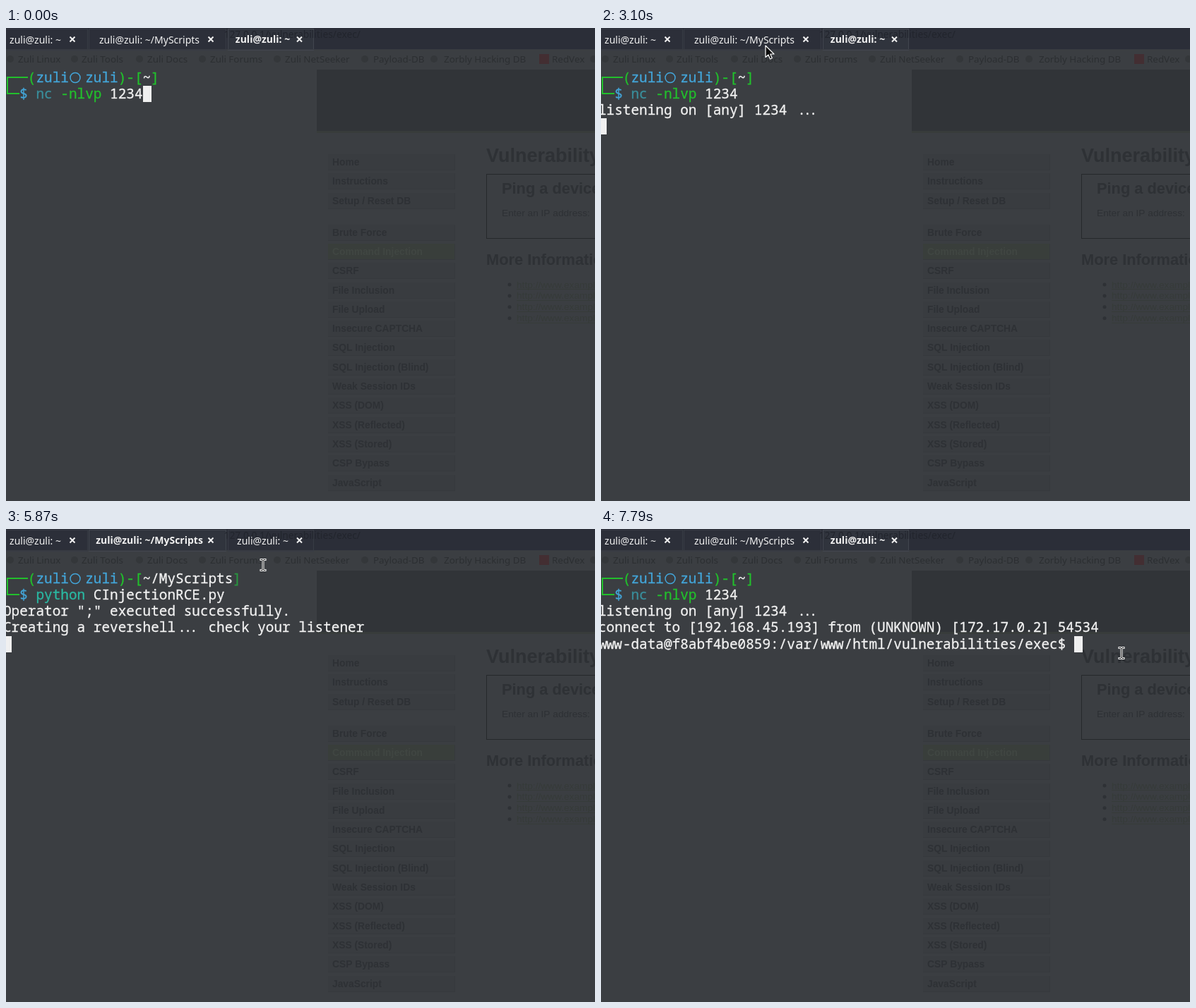
These frames come from a looping animation (834x671 px, 8 s). An HTML page with a canvas:

```html
<!DOCTYPE html>
<html lang="en">
<head>
<meta charset="utf-8">
<title>Terminal session</title>
<style>
html, body { margin: 0; width: 100%; height: 100%; overflow: hidden; background: #3b3e42; }
canvas { display: block; }
</style>
</head>
<body>
<canvas id="stage" width="834" height="671"></canvas>
<script>
const ctx = document.getElementById('stage').getContext('2d');
const LOOP = 8000;
const UI = '"Noto Sans", sans-serif';
const PAGE = '"Liberation Sans", Arial, sans-serif';
const MONO = '500 19.37px "Noto Sans Mono", monospace';
const CELL = 11.62, LINE = 23.3, LEFT = -4, TOP = 58.5;
const GREEN = '#22c02c', BLUE = '#43a6da', WHITE = '#f2f2f2', TEAL = '#3a8e9b', AQUA = '#2ab8a2';
const DIM = '#2e3135';

function rect(x, y, w, h, color) {
  ctx.fillStyle = color;
  ctx.fillRect(x, y, w, h);
}

function label(str, x, y, font, color, align = 'left') {
  ctx.font = font;
  ctx.fillStyle = color;
  ctx.textAlign = align;
  ctx.fillText(str, x, y);
}

function disc(x, y, r, color) {
  ctx.fillStyle = color;
  ctx.beginPath();
  ctx.arc(x, y, r, 0, 7);
  ctx.fill();
}

// ---- Web page showing faintly through the terminal ----
const bookmarks = [
  ['Zuli Linux', 17, 6], ['Zuli Tools', 107, 97], ['Zuli Docs', 200, 189], ['Zuli Forums', 289, 278],
  ['Zuli NetSeeker', 395, 384], ['Payload-DB', 520, 508], ['Zorbly Hacking DB', 620, 606], ['RedVex', 773, 762]
];
const menus = [
  [190, ['Home', 'Instructions', 'Setup / Reset DB']],
  [289.6, ['Brute Force', 'Command Injection', 'CSRF', 'File Inclusion', 'File Upload', 'Insecure CAPTCHA',
    'SQL Injection', 'SQL Injection (Blind)', 'Weak Session IDs', 'XSS (DOM)', 'XSS (Reflected)',
    'XSS (Stored)', 'CSP Bypass', 'JavaScript']]
];

function drawPage() {
  rect(0, 0, 834, 671, '#3b3e42');
  for (const [name, x, iconX] of bookmarks) {
    if (name === 'RedVex') rect(iconX - 7, 37, 14, 14, '#432e32');
    else disc(iconX, 44, 5, '#34373a');
    label(name, x, 48.5, '13.4px ' + UI, '#2c2f32');
  }
  disc(832, 44, 5, '#34373a');
  rect(440, 59, 394, 87, '#313438');
  rect(440, 146, 394, 3, '#383c3b');

  for (const [firstY, items] of menus) {
    items.forEach((item, i) => {
      const y = Math.round(firstY + i * 27.3);
      const chosen = item === 'Command Injection';
      rect(456, y - 11, 180, 23, '#36393d');
      rect(456, y - 11, 179, 22, chosen ? '#393e3b' : '#393c40');
      label(item, 462, y + 5, 'bold 13.8px ' + PAGE, chosen ? '#404642' : DIM);
    });
  }

  label('Vulnerability: Command Injection', 680, 190, 'bold 27px ' + PAGE, DIM);
  ctx.strokeStyle = '#25282b';
  ctx.lineWidth = 1;
  ctx.strokeRect(680.5, 207.5, 200, 91);
  label('Ping a device', 702, 234.5, 'bold 21.8px ' + PAGE, DIM);
  label('Enter an IP address:', 702, 267, '13.7px ' + PAGE, DIM);
  label('More Information', 680, 336, 'bold 21.8px ' + PAGE, DIM);
  for (let i = 0; i < 4; i++) {
    const y = 364 + i * 15.9;
    disc(713, y, 2.5, DIM);
    label('http://www.example.org/', 723, y + 4.5, '13.7px ' + PAGE, '#363b39');
    rect(723, Math.round(y + 6), 111, 1, '#363b39');
  }
}

// ---- Tab bar ----
const tabs = [['zuli@zuli: ~', -6, 115, 41.5, 94], ['zuli@zuli: ~/MyScripts', 117, 311, 203, 290],
  ['zuli@zuli: ~', 314, 435, 363.5, 415.5]];

function drawTabs(active) {
  rect(0, 0, 834, 30, '#2b2e38');
  tabs.forEach(([, x0, x1], i) => {
    rect(x0, 1, x1 - x0, 29, i === active ? '#30343d' : '#2c2f39');
    ctx.strokeStyle = i === active ? '#42464f' : '#383c45';
    ctx.lineWidth = 1;
    ctx.strokeRect(x0 + .5, 1.5, x1 - x0, 30);
  });
  label('127.0.0.1/vulnerabilities/exec/', 502, 14, '13.8px ' + UI, '#22252d', 'right');
  rect(0, 30, 834, 1, '#383b41');
  tabs.forEach(([name, , , center, closeX], i) => {
    const on = i === active;
    label(name, center, on ? 21 : 22, (on ? '600 ' : '') + '14px ' + UI, WHITE, 'center');
    ctx.strokeStyle = WHITE;
    ctx.lineWidth = 2;
    ctx.beginPath();
    for (const s of [-1, 1]) {
      ctx.moveTo(closeX - 3.5, 16 - 3.5 * s);
      ctx.lineTo(closeX + 3.5, 16 + 3.5 * s);
    }
    ctx.stroke();
  });
}

// ---- Terminal ----
// Dots and w's in runs of three sit closer together, as in a ligature font.
function type(str, col, row, color = WHITE) {
  const shift = {};
  for (const m of str.matchAll(/\.\.\.|www/g)) {
    const d = m[0] === 'www' ? 1 : 3.3;
    shift[m.index] = d;
    shift[m.index + 2] = -d;
  }
  const y = Math.round(TOP + 18 + row * LINE);
  ctx.strokeStyle = color;
  ctx.lineWidth = .3;
  [...str].forEach((ch, i) => {
    const x = LEFT + (col + i) * CELL + (shift[i] || 0);
    label(ch, x, y, MONO, color);
    ctx.strokeText(ch, x, y);
  });
}

function block(col, row) {
  rect(Math.round(LEFT + col * CELL), Math.round(TOP + row * LINE), 12, 23, '#f0f0f0');
}

function drawPrompt(dir, bracketColor) {
  ctx.strokeStyle = GREEN;
  ctx.lineWidth = 2;
  ctx.beginPath();
  ctx.moveTo(31, 70);
  ctx.lineTo(2, 70);
  ctx.lineTo(2, 93);
  ctx.lineTo(19, 93);
  ctx.stroke();
  type('(', 3, 0, GREEN);
  type('zuli', 4, 0, BLUE);
  ctx.strokeStyle = BLUE;
  ctx.lineWidth = 1.5;
  ctx.beginPath();
  ctx.arc(98, 70.5, 7, 0, 7);
  ctx.stroke();
  type('zuli', 10, 0, BLUE);
  type(')-[', 14, 0, GREEN);
  type(dir, 17, 0);
  type(']', 17 + dir.length, 0, bracketColor);
  type('$', 2, 1, BLUE);
}

function drawListener(t) {
  drawPrompt('~', GREEN);
  type('nc', 4, 1, TEAL);
  type('-nlvp', 7, 1, GREEN);
  type('1234', 13, 1);
  if (t < 2100) return block(17, 1);
  type('listening on [any] 1234 ...', 0, 2);
  if (t < 6870) return block(0, 3);
  type('connect to [192.168.45.193] from (UNKNOWN) [172.17.0.2] 54534', 0, 3);
  type('www-data@f8abf4be0859:/var/www/html/vulnerabilities/exec$', 0, 4);
  block(58, 4);
}

function drawScript(t) {
  drawPrompt('~/MyScripts', '#2a9440');
  type('python', 4, 1, AQUA);
  type('CInjectionRCE.py', 11, 1);
  if (t < 4680) return block(27, 1);
  if (t < 4880) return block(0, 2);
  type('Operator ";" executed successfully.', 0, 2);
  type('Creating a revershell... check your listener', 0, 3);
  block(0, 4);
}

// ---- Mouse pointer ----
// Each move: start, end, number of steps, points passed at even intervals.
const moves = [
  [310, 910, 10, [[805, 730], [600, 500], [411, 300], [437, 245]]],
  [1170, 1500, 6, [[437, 245], [385, 135], [370, 110]]],
  [2430, 3100, 10, [[370, 110], [290, 60], [232, 24], [233, 25]]],
  [3760, 4220, 7, [[233, 25], [332, 100], [344, 103.5], [347, 103]]],
  [5600, 6010, 7, [[347, 103], [363, 55], [370, 27]]],
  [6210, 6270, 2, [[370, 27], [374.5, 27]]],
  [6470, 6540, 2, [[374.5, 27], [377, 20.5]]],
  [7210, 7790, 9, [[377, 20.5], [600, 140], [735, 196], [748, 198], [737, 176]]]
];

function pointerAt(t) {
  const move = moves.findLast(m => t >= m[0]);
  if (!move) return null;
  const [start, end, steps, path] = move;
  const step = Math.floor((t - start) / (end - start) * (steps - 1) + 1e-6) + 1;
  const along = Math.min(1, step / steps) * (path.length - 1);
  const i = Math.min(Math.floor(along), path.length - 2);
  const [a, b] = [path[i], path[i + 1]];
  return a.map((v, k) => v + (b[k] - v) * (along - i));
}

const arrow = new Path2D('M0 0V16.5L4 13L6.5 19L9.3 17.8L6.8 12H12Z');
const hand = new Path2D('M-1.5 2Q0 -.5 1.5 2V9L3 8.3L5 9.3L7 9L8.5 10.5L10 11V16L8 22H-1L-5 15Q-7 11 -4 12L-1.5 14Z');
const beam = new Path2D('M-3 -7.5H-1L0 -6.5L1 -7.5H3M0 -6.5V6.5M-3 7.5H-1L0 6.5L1 7.5H3');

function drawPointer(t) {
  const pos = pointerAt(t);
  if (!pos) return;
  ctx.save();
  ctx.translate(...pos);
  ctx.lineJoin = 'round';
  if (t >= 1170 && pos[1] > 38) {
    ctx.lineCap = 'square';
    for (const [width, color] of [[3, '#fff'], [1, '#0c0c0c']]) {
      ctx.lineWidth = width;
      ctx.strokeStyle = color;
      ctx.stroke(beam);
    }
  } else {
    const isHand = t < 1170;
    ctx.fillStyle = isHand ? '#fff' : '#0c0c0c';
    ctx.strokeStyle = isHand ? '#222' : '#fff';
    ctx.lineWidth = 1.2;
    ctx.fill(isHand ? hand : arrow);
    ctx.stroke(isHand ? hand : arrow);
  }
  ctx.restore();
}

function frame() {
  const t = performance.now() % LOOP;
  const scriptTab = t >= 3560 && t < 6870;
  drawPage();
  drawTabs(scriptTab ? 1 : 2);
  (scriptTab ? drawScript : drawListener)(t);
  drawPointer(t);
  requestAnimationFrame(frame);
}
frame();
</script>
</body>
</html>
```
